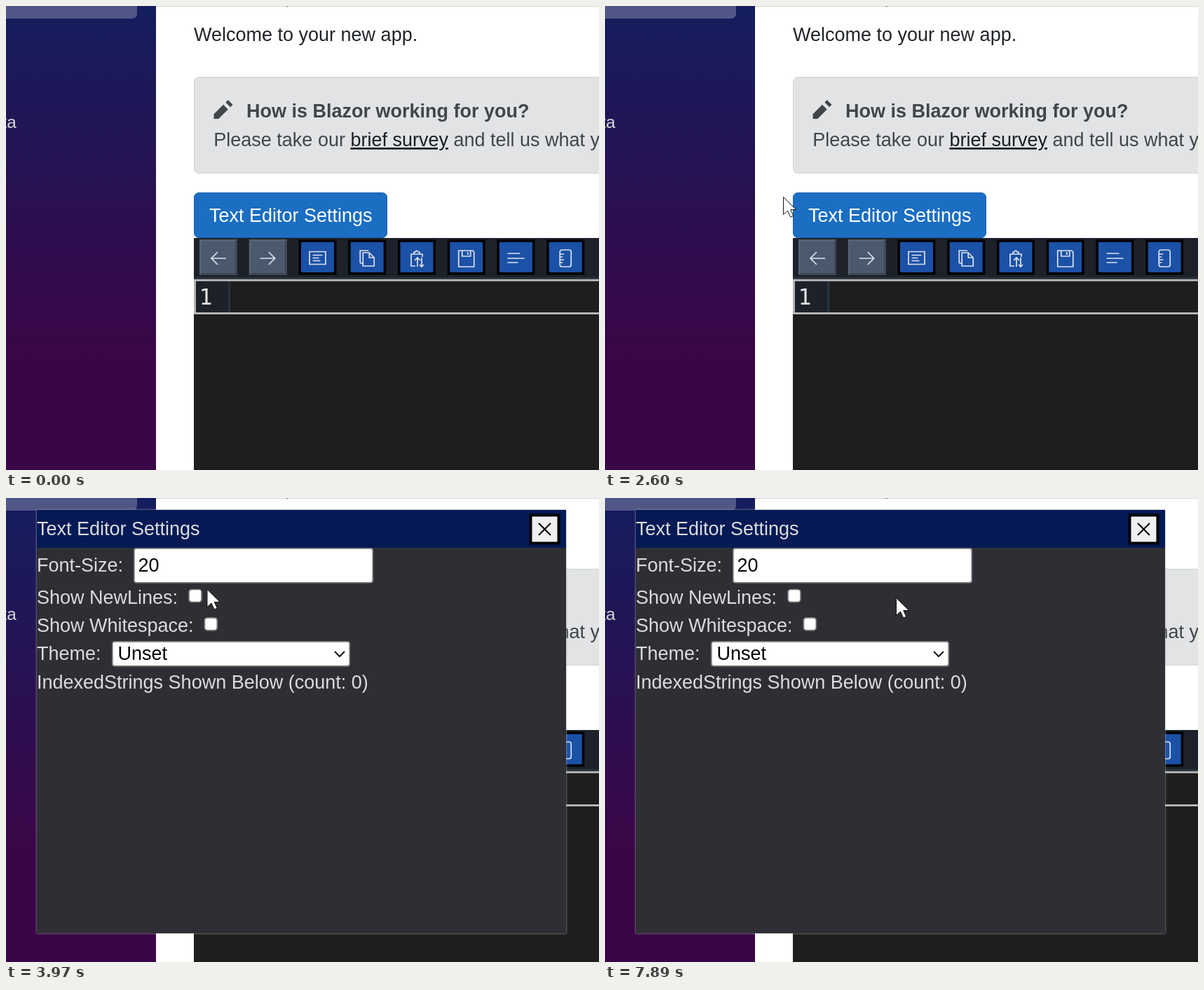
An HTML page that plays this animation: 846x662 px, repeating every 8000 ms.

```html
<!DOCTYPE html>
<html lang="en">
<head>
<meta charset="utf-8">
<title>Text Editor Settings</title>
<style>
html, body { margin: 0; width: 100%; height: 100%; overflow: hidden; background: #fff; }
svg { display: block; width: 100%; height: 100%; }
text { font: 27px "Liberation Sans", Arial, sans-serif; white-space: pre; }
.line { fill: none; stroke: #dde3ee; stroke-width: 1.7; }
.box { fill: #fff; stroke: #767676; stroke-width: 1.7; }
#dialog text { fill: #dcdcdc; }
#dialog .dark { fill: #000; }
#panel { filter: drop-shadow(0 0 1.5px #aaa); }
</style>
</head>
<body>
<svg viewBox="0 0 846 662" preserveAspectRatio="none">
  <defs>
    <linearGradient id="side" gradientUnits="userSpaceOnUse" x1="0" y1="-195" x2="0" y2="495">
      <stop stop-color="#052767"/><stop offset="1" stop-color="#3a0647"/>
    </linearGradient>
  </defs>
  <rect width="240" height="662" fill="url(#side)"/>
  <text x="-5.5" y="174" fill="#d7d7d7" style="font-size:24.3px">ta</text>

  <g id="page">
    <rect x="-100" y="-40" width="287" height="58" rx="7" fill="#fff" fill-opacity=".25"/>
    <rect x="214" width="700" height="662" fill="#fff"/>
    <path d="M214 .5h700" stroke="#d6d5d5"/>
    <rect x="400" width="3" height="1" fill="#777"/>
    <text x="268" y="50" fill="#212529">Welcome to your new app.</text>
    <rect x="268.5" y="101.5" width="700" height="137" rx="6.5" fill="#e2e3e5" stroke="#d0d3d5"/>
    <path transform="translate(296.5 134) scale(3.375)" fill="#41464b" d="M6 0L5 1l2 2 1-1zM4 2L0 6v2h2l4-4z"/>
    <text x="343" y="159" fill="#41464b" style="font-weight:bold">How is Blazor working for you?</text>
    <text x="296.3" y="200" fill="#41464b">Please take our <tspan fill="#1a1e21" text-decoration="underline">brief survey</tspan> and tell us what you think.</text>

    <rect x="268" y="331" width="700" height="340" fill="#1e1e1e"/>
    <rect id="bar" x="268" y="331" width="700" fill="#1d2129"/>
    <g id="tools"></g>
    <g id="row">
      <path d="M268 388h700" stroke="#26343d" stroke-width="2.5"/>
      <rect x="271" y="392" width="47" height="46" fill="#1d212a"/>
      <path d="M318.5 392v46" stroke="#26343d" stroke-width="3"/>
      <rect x="269.5" y="391.2" width="720" height="47.3" fill="none" stroke="#bdbdbd" stroke-width="2.8"/>
      <text x="275.5" y="426" fill="#e4e4e4" style="font:31.5px 'DejaVu Sans Mono',monospace">1</text>
    </g>
    <rect id="button" x="268.5" y="266.5" width="275" height="64" rx="6.5"/>
    <rect id="ring" x="264.6" y="263.1" width="282.8" height="71" rx="10" fill="none" stroke="#3184fd" stroke-opacity=".5" stroke-width="6.8"/>
    <text x="290" y="307.5" fill="#fff">Text Editor Settings</text>
  </g>

  <g id="dialog">
    <rect id="panel" x="44" y="17" width="755" height="604" fill="#2e2f34"/>
    <rect x="44" y="17" width="755" height="54" fill="#051a55"/>
    <text x="44" y="53">Text Editor Settings</text>
    <rect x="748.5" y="24.5" width="40" height="40" fill="#efefef" stroke="#000" stroke-width="4"/>
    <path d="M760 36l17 17m0-17l-17 17" stroke="#000" stroke-width="2"/>
    <text x="44" y="105">Font-Size:</text>
    <rect class="box" x="182.8" y="71.8" width="340.5" height="49" rx="3"/>
    <g id="focus">
      <rect x="181" y="70" width="344" height="52" rx="4" fill="#fff" stroke="#fff" stroke-width="2.4"/>
      <rect x="183.2" y="72.2" width="339.6" height="47.6" rx="2.5" fill="#fff" stroke="#101010" stroke-width="3"/>
    </g>
    <g id="spin">
      <rect x="492" y="77" width="26" height="39" fill="#f0f0f0"/>
      <path d="M498 90l6.5-7 6.5 7zM498 102.500l6.500 7 6.500-7z" fill="#505050"/>
    </g>
    <text id="value" class="dark" x="188.500" y="105">20</text>
    <path id="caret" d="M218.500 81v30" stroke="#000" stroke-width="1.700"/>
    <text x="44" y="151">Show NewLines:</text>
    <rect class="box" x="261" y="130.500" width="18" height="18" rx="4"/>
    <text x="44" y="191">Show Whitespace:</text>
    <rect class="box" x="283.300" y="170.800" width="18" height="18" rx="4"/>
    <text x="44" y="231">Theme:</text>
    <rect id="select" class="box" x="151.800" y="204.800" width="338.500" height="35" rx="3"/>
    <text class="dark" x="159.500" y="231">Unset</text>
    <path d="M469 219l7 7 7-7" fill="none" stroke="#111" stroke-width="2"/>
    <text x="44" y="271.500">IndexedStrings Shown Below (count: 0)</text>
  </g>

  <g id="cursor" stroke-linejoin="round">
    <path id="arrow" d="M.500 .500V25.500l6-5.500 4.200 9 4-1.800-4-8.700h8z" fill="#fff" stroke="#111"/>
    <g id="hand" transform="translate(-9 -1)" stroke="#111">
      <path fill="#fff" d="M9 1c2 0 2.500 1 2.500 2.500V13c1-1.200 3.500-1 4 .6 1.200-1 3.500-.6 4 1 1.600-.8 4.500 0 4.500 2.300V23c0 5-3 8.500-8 8.500-4 0-6-1.500-8-5.500L2 19c-1-1.800 1-4 3-2.500l2 2V3.500C7 2 7.500 1 9 1z"/>
      <path fill="none" d="M11.500 13v5m4-4v4.500m4-4v4"/>
    </g>
    <path id="beam" d="M-5-14h3.500L0-12.500 1.500-14H5M0-12.500v25M-5 14h3.500L0 12.500 1.500 14H5" fill="none" stroke-width="1.600"/>
  </g>
</svg>
<script>
const $ = id => document.getElementById(id);
const LOOP = 8000;

// Toolbar: icon paths are relative to the centre of each button
const icons = [
  'M11 0H-10M-1-9L-10 0l9 9',
  'M-11 0H10M1-9l9 9-9 9',
  'M-11.500-9.500h23v18h-23zM-7-4.500H7M-7-.500H2M-7 3.500H4',
  'M-6-8H3l7 7v12H-6zM3-8v7h7M-6 7h-2q-2 0-2-2V-11H2',
  'M-2 11H-8V-6H8V-2M-4-6v-3h2q2-4 4 0h2v3M1 12V-1M-3 3l4-4 4 4M7-1V12M4 9l3 3 3-3',
  'M-11-11H9l2 2V12H-11zM-6-11v8H6v-8M2-9v4',
  'M-12-7H6M-12 0H12M-12 6H3',
  'M-5-12H5q3 0 3 3V9q0 3-3 3H-5q-3 0-3-3V-9q0-3 3-3zM-8-6h6M-8-2h4M-8 2h6M-8 6h4'
];
const toolX = i => 276 + 70.75 * i;
$('tools').innerHTML = icons.map((d, i) => {
  const x = toolX(i), off = i < 2;
  const frame = off
    ? `<rect x="${x}" y="333" width="54" height="51" fill="#556275"/>
       <path d="M${x} 384h54v-51l-3 3v45h-48z" fill="#3e4653"/>
       <rect x="${x + 3}" y="336" width="48" height="45" fill="#4a596e"/>`
    : `<rect x="${x + 1.7}" y="335.200" width="50.500" height="46.500" fill="#1b51a6" stroke="#000" stroke-width="3.500"/>`;
  return `${frame}<path class="line" transform="translate(${x + 27} 360)" d="${d}"/>`;
}).join('');

// Pointer path: time, x, y
const path = [
  [70, 812, 635], [450, 757, 490], [820, 709, 363], [890, 706, 358], [1300, 645, 283],
  [1650, 589, 342], [1840, 527, 269], [2000, 455, 258], [2300, 330, 256], [2460, 275, 258],
  [2600, 254, 272], [2750, 258, 284], [3160, 281, 293], [3420, 281, 293], [3700, 284, 210],
  [3970, 286, 130], [4240, 418, 104], [4400, 424, 104], [4780, 424, 133], [7430, 424, 133], [7890, 415, 142]
];
// Font size steps; each one also restarts the caret blink
const sizes = [[4310, 20], [5310, 21], [5840, 22], [6370, 21], [6520, 20]];
const OPEN = 3230, PRESS = 3080, FOCUS = 4310, BLUR = 7550;

const clamp = v => Math.max(0, Math.min(1, v));
const fade = (t, from, to) => clamp((t - from) / 140) - clamp((t - to) / 140);
const mix = (a, b, k) => `rgb(${a.map((v, i) => Math.round(v + (b[i] - v) * k))})`;
const show = (id, on) => $(id).style.display = on ? '' : 'none';
const move = (id, x, y) => $(id).setAttribute('transform', `translate(${x} ${y})`);

function pointer(t) {
  const i = path.findIndex(p => p[0] > t);
  if (i < 0) return path[path.length - 1].slice(1);
  if (!i) return path[0].slice(1);
  const [t0, x0, y0] = path[i - 1], [t1, x1, y1] = path[i];
  const k = (t - t0) / (t1 - t0);
  return [x0 + (x1 - x0) * k, y0 + (y1 - y0) * k];
}

function draw(t) {
  const open = t >= OPEN, focus = t >= FOCUS && t < BLUR;
  const [x, y] = pointer(t);
  const inside = (l, top, r, b) => x >= l && x < r && y >= top && y < b;
  const [since, size] = sizes.filter(s => s[0] <= t).pop() || [0, 20];
  const grow = size - 20;

  move('page', -13 * grow, 0);
  move('row', 0, 3 * grow);
  $('bar').setAttribute('height', 57 + 3 * grow);

  const pressed = t >= PRESS && !open;
  const hover = fade(t, 1670, 1880) + fade(t, 2880, 9000);
  $('button').setAttribute('fill', pressed ? '#0a58ca' : mix([27, 110, 194], [11, 94, 215], hover));
  $('button').setAttribute('stroke', pressed ? '#0a53be' : mix([24, 97, 172], [10, 88, 202], hover));
  show('ring', pressed);

  const onInput = open && inside(182, 71, 524, 121);
  show('dialog', open);
  show('focus', focus);
  show('spin', focus || onInput);
  show('caret', focus && (t - since) % 1060 < 530);
  $('value').textContent = size;
  $('select').style.stroke = open && inside(151, 204, 491, 240) ? '#4f4f4f' : '';

  const onTool = icons.some((d, i) => i > 1 && inside(toolX(i), 333, toolX(i) + 54, 384));
  const hand = !open && (onTool || inside(268, 266, 544, 331));
  const beam = open ? onInput && x < 492 : inside(268, 390, 846, 662);
  show('cursor', t >= 70);
  move('cursor', x, y);
  show('hand', hand);
  show('beam', beam);
  show('arrow', !hand && !beam);
  $('beam').setAttribute('stroke', open ? '#000' : '#e0e0e0');
}

const start = performance.now();
function tick() {
  draw((performance.now() - start) % LOOP);
  requestAnimationFrame(tick);
}
tick();
</script>
</body>
</html>
```
